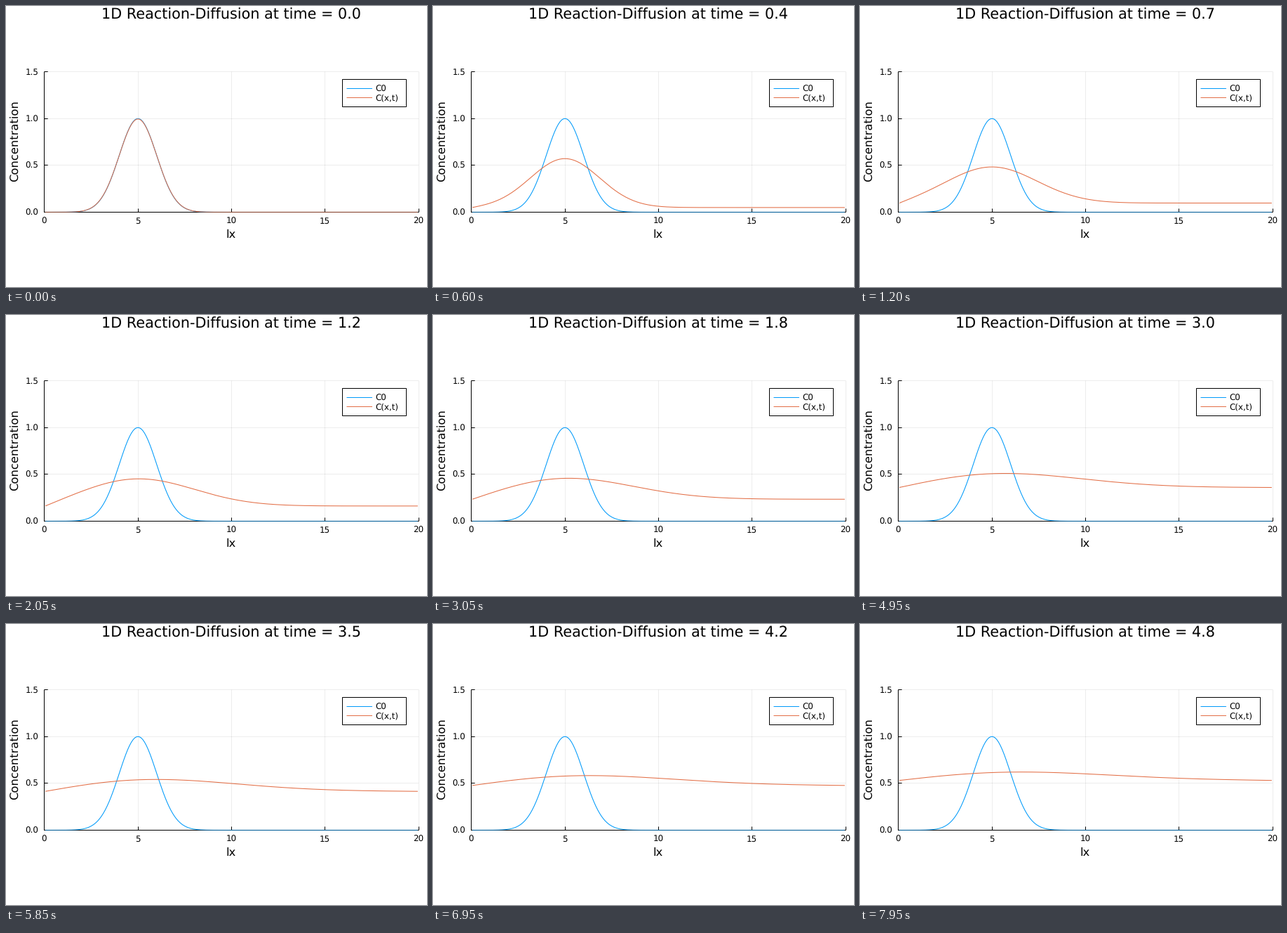
Recreate the animation shown at these times as a matplotlib script. Size 600 by 400 pixels, loop 8 s.

```python
import numpy as np
import matplotlib.pyplot as plt
from matplotlib.animation import FuncAnimation
from matplotlib.patches import Rectangle

plt.rcParams["font.family"] = "DejaVu Sans"
plt.rcParams["text.hinting"] = "none"

W, H, DPI = 600, 400, 100
PT = 72 / DPI
BLUE, ORANGE = "#009afa", "#e36f47"
FRAMES, INTERVAL = 160, 50

# physics
LX, NX = 20.0, 200
DIFF, XI, CEQ = 10 / 3, 10.0, 1.4
DX = LX / NX
DT = DX**2 / DIFF / 2
NVIS = 20

# plot area in pixels
LEFT, RIGHT, TOP, BOTTOM = 54.7, 588.2, 93.5, 293.5


def px(x):
    return LEFT + (RIGHT - LEFT) * np.asarray(x) / LX


def py(c):
    return BOTTOM - (BOTTOM - TOP) * np.asarray(c) / 1.5


def crisp(v):
    """Centre of the pixel that holds v."""
    return np.floor(v) + 0.5


def simulate(c):
    """Explicit reaction-diffusion; keeps the state every NVIS steps."""
    c = c.copy()
    states = []
    for step in range((FRAMES - 1) * NVIS + 1):
        flux = -DIFF * np.diff(c) / DX
        c[1:-1] -= DT * np.diff(flux) / DX
        c -= DT * (c - CEQ) / XI
        if step % NVIS == 0:
            states.append(c.copy())
    return states


xc = np.linspace(DX / 2, LX - DX / 2, NX)
c0 = np.exp(-0.5 * (xc - LX / 4) ** 2)
states = simulate(c0)

fig = plt.figure(figsize=(W / DPI, H / DPI), dpi=DPI, facecolor="white")
ax = fig.add_axes([0, 0, 1, 1])
ax.set_xlim(0, W)
ax.set_ylim(H, 0)
ax.axis("off")


def line(xs, ys, color="black", width=1.0, z=2, **kw):
    return ax.plot(xs, ys, color=color, lw=width * PT, zorder=z,
                   snap=False, solid_capstyle="butt", **kw)[0]


def label(x, y, s, size, **kw):
    kw.setdefault("va", "baseline")
    return ax.text(x, y, s, fontsize=size * PT, color="black", zorder=8, **kw)


# grid, ticks and tick labels
for v in (0, 5, 10, 15, 20):
    x = crisp(px(v))
    line([x, x], [TOP, BOTTOM], alpha=0.07, z=1)
    line([x, x], [BOTTOM - 5, BOTTOM])
    label(px(v) - 0.3, 310, str(v), 11.9, ha="center")
for v in (0.0, 0.5, 1.0, 1.5):
    y = crisp(py(v))
    line([LEFT, RIGHT], [y, y], alpha=0.07, z=1)
    line([LEFT, LEFT + 5], [y, y])
    label(46.5, y + 4.4, f"{v:.1f}", 11.9, ha="right")

# axis lines; the lower one also partly covers curves lying on it
x, y = crisp(LEFT), crisp(BOTTOM)
line([x, x], [TOP, BOTTOM + 0.5])
line([x, RIGHT], [y, y])
line([x, RIGHT], [y, y], alpha=0.4, z=5)

label(321.0, 330, "lx", 16.35, ha="center")
label(16.6, 191.8, "Concentration", 16.35, ha="center",
      rotation=90, rotation_mode="anchor")
title = label(136.3, 19, "", 20.8, ha="left")

# curves
line(px(xc), py(c0), BLUE, 1.05, 3)
curve = line(px(xc), py(c0), ORANGE, 1.05, 4)

# legend
ax.add_patch(Rectangle((479.5, 104.5), 91, 39, fc="white", ec="black",
                       lw=PT, zorder=6, snap=False))
for y, color, name in ((117.5, BLUE, "C0"), (130.5, ORANGE, "C(x,t)")):
    line([485.5, 522], [y, y], color, 1.0, 7)
    label(526, y + 4.4, name, 11.9, ha="left")


def update(i):
    t = (i * NVIS + 1) * DT
    curve.set_ydata(py(states[i]))
    title.set_text(f"1D Reaction-Diffusion at time = {t:.1f}")
    return curve, title


anim = FuncAnimation(fig, update, frames=FRAMES, interval=INTERVAL,
                     repeat=True, repeat_delay=0, blit=False)
plt.show()
```
